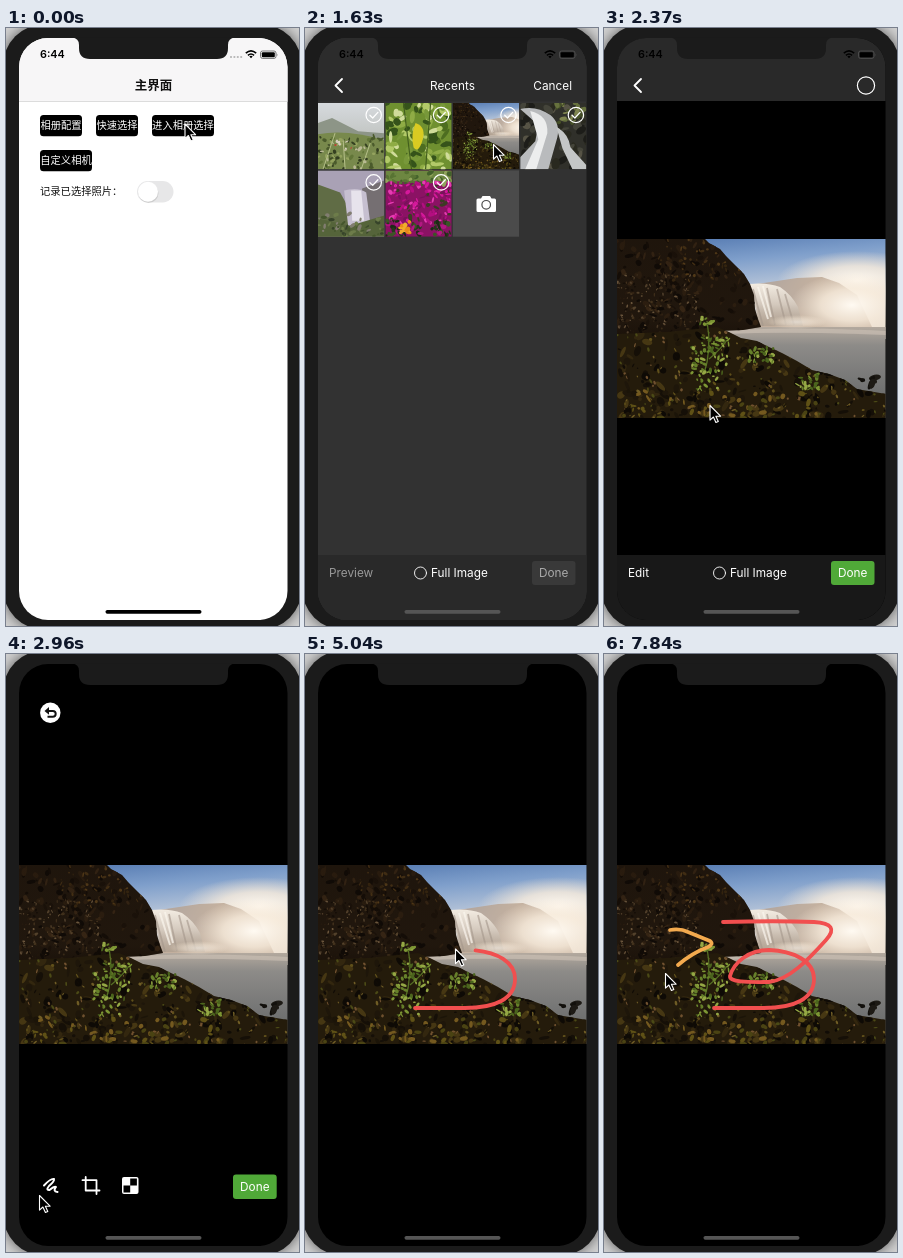
Animation, 293 px wide and 598 px high, one loop 7.99 s. Source, as an HTML page:

```html
<!DOCTYPE html>
<html lang="zh-CN">
<head>
<meta charset="utf-8">
<title>Photo picker</title>
<style>
html, body { margin: 0; width: 100%; height: 100%; overflow: hidden; background: #d2d2d2; }
svg { display: block; }
text { font: 11.8px Inter, "Noto Sans CJK SC", "Noto Sans CJK", sans-serif; fill: #fff; }
.zh { font: 10.3px "Noto Sans CJK SC", "Noto Sans CJK", sans-serif; }
.title { font-size: 12.5px; font-weight: 600; fill: #111; }
.ink { fill: #111; }
.clock { font-weight: 600; font-size: 10.8px; fill: #000; }
.line { fill: none; stroke: #fff; stroke-linecap: round; stroke-linejoin: round; }
.body { fill: #1b1b1b; filter: drop-shadow(0 0 7px rgba(0, 0, 0, .6)); }
</style>
</head>
<body>
<svg id="stage" width="293" height="598" viewBox="0 0 293 598">
  <defs>
    <clipPath id="screen"><rect x="13" y="10" width="268.5" height="582" rx="29"/></clipPath>
    <clipPath id="cliffClip"><path id="cliff" d="M0 0H88L92 4L103 10L109 17L119 27L127 35L133 45L137 56L138 70L141 80L144 88L126 91L100 92L0 100Z"/></clipPath>
    <clipPath id="shoreClip"><path id="shore" d="M0 95L50 93L100 88L112 93L124 99L140 102L152 108L165 114L180 122L195 131L212 135L228 141L240 150L269 155V179H0Z"/></clipPath>
    <linearGradient id="sky" x1="0" y1="0" x2=".25" y2="1">
      <stop offset="0" stop-color="#4e74ad"/><stop offset=".3" stop-color="#7f9fcb"/>
      <stop offset=".65" stop-color="#c6cfdc"/><stop offset="1" stop-color="#eadfd2"/>
    </linearGradient>
    <linearGradient id="river" x2="0" y2="1">
      <stop offset="0" stop-color="#b3a99e"/><stop offset=".2" stop-color="#8d8b88"/><stop offset="1" stop-color="#5f6264"/>
    </linearGradient>
    <linearGradient id="fall" x2="0" y2="1">
      <stop offset="0" stop-color="#f3ece2"/><stop offset=".5" stop-color="#d3c8bc"/><stop offset="1" stop-color="#a89a8b" stop-opacity=".6"/>
    </linearGradient>
    <radialGradient id="glow">
      <stop offset="0" stop-color="#fffaf2"/><stop offset=".5" stop-color="#f8ecdc" stop-opacity=".8"/><stop offset="1" stop-color="#f4e6d4" stop-opacity="0"/>
    </radialGradient>
    <linearGradient id="shade" x2="0" y2="1">
      <stop offset="0" stop-color="#140c06" stop-opacity=".25"/><stop offset=".8" stop-color="#140c06" stop-opacity=".1"/><stop offset="1" stop-color="#140c06" stop-opacity=".55"/>
    </linearGradient>
    <linearGradient id="haze" x2="0" y2="1">
      <stop offset="0" stop-color="#d6dade"/><stop offset="1" stop-color="#aeb0a6"/>
    </linearGradient>
    <symbol id="photo" viewBox="0 0 269 179" overflow="hidden"></symbol>
    <g id="check"><circle r="7.7" class="line" stroke-width="1.2"/><path class="line" stroke-width="1.3" d="M-3.8 .2L-1 3L4.2 -2.6"/></g>
    <path id="back" class="line" stroke-width="1.8" d="M37 51L30.5 57.5L37 64"/>
    <g id="undo"><path fill="none" stroke="currentColor" stroke-width="2" d="M-3 -1.8H1.8A2.900 2.900 0 0 1 1.800 4H-3.500"/><path fill="currentColor" d="M-2 -5.600V2L-6.500 -1.800Z"/></g>
  </defs>

  <rect class="body" x="-3" y="-4" width="299" height="606" rx="42"/>
  <g clip-path="url(#screen)">
    <g id="home">
      <rect x="13" y="10" width="269" height="582" fill="#fff"/>
      <rect x="13" y="10" width="269" height="63" fill="#f7f6f7"/>
      <rect x="13" y="73" width="269" height="1" fill="#dcdcdc"/>
      <text class="zh title" x="147.5" y="62" text-anchor="middle">主界面</text>
      <g id="buttons"></g>
      <text class="zh ink" x="34" y="167">记录已选择照片：</text>
      <rect x="131" y="153" width="36.5" height="21.5" rx="10.75" fill="#e7e7e8"/>
      <circle cx="142.5" cy="165" r="10" fill="#bbb" opacity=".6"/>
      <circle cx="142" cy="163.7" r="10" fill="#fff"/>
    </g>

    <g id="sheet">
      <g id="album">
        <rect x="13" y="10" width="269" height="582" fill="#323232"/>
        <rect x="13" y="10" width="269" height="63.5" fill="#2c2c2c"/>
        <use href="#back"/>
        <text x="147.5" y="61.5" text-anchor="middle">Recents</text>
        <text x="267" y="61.5" text-anchor="end">Cancel</text>
        <g id="grid"></g>
        <rect x="13" y="527" width="269" height="65" fill="#292929"/>
        <text x="24" y="549.3" style="fill:#999">Preview</text>
        <circle cx="115.5" cy="545" r="6" class="line" stroke-width=".9"/>
        <text x="126" y="549.3">Full Image</text>
        <rect x="227" y="533" width="43.5" height="24" rx="3" fill="#393939"/>
        <text x="248.7" y="549.3" text-anchor="middle" style="fill:#aaa">Done</text>
      </g>
      <rect id="dim" x="13" y="10" width="269" height="582" opacity="0"/>
    </g>

    <g id="preview">
      <rect x="13" y="10" width="269" height="582"/>
      <rect x="13" y="10" width="269" height="63" fill="#292929"/>
      <use href="#back"/>
      <circle cx="262" cy="57.5" r="8.6" class="line" stroke-width="1.2"/>
      <use href="#photo" x="13" y="211" width="269" height="179"/>
      <rect x="13" y="527" width="269" height="65" fill="#181818"/>
      <text x="24" y="549.3">Edit</text>
      <circle cx="115.5" cy="545" r="6" class="line" stroke-width=".9"/>
      <text x="126" y="549.3">Full Image</text>
      <rect x="227" y="533" width="43.5" height="24" rx="3" fill="#50a938"/>
      <text x="248.7" y="549.3" text-anchor="middle">Done</text>
    </g>

    <g id="editor">
      <rect x="13" y="10" width="269" height="582"/>
      <use href="#photo" x="13" y="211" width="269" height="179"/>
      <path id="red" class="line" style="stroke:#f14f4f" stroke-width="3.8" d="M110 354H160C190 354 210 345 210 325C210 306 188 297 165 296C145 296 130 308 126 322C125 329 148 328 165 328C185 326 205 305 222 286C232 275 228 269 210 268C185 267 155 267 119 268"/>
      <path id="amber" class="line" style="stroke:#f3aa4e" stroke-width="3.8" d="M66 276C72 275 78 275 84 278L106 287Q110 290 104 293Q88 299 74 311"/>
      <g id="tools">
        <circle cx="44.3" cy="58.7" r="10.2" fill="#fff"/>
        <use href="#undo" x="45" y="58.7" color="#111"/>
        <path id="pen" class="line" stroke-width="2" d="M38 531.5Q45 524 48 525Q48.500 527.500 43 532Q39.500 536.500 43.500 536Q48.500 532 50 533Q46.500 537.500 51.500 538"/>
        <path class="line" stroke-width="1.8" d="M76.5 526.2H90.5V540M79.700 523V536.500H93.500"/>
        <rect x="116" y="523" width="16.5" height="17" rx="2" fill="#fff"/>
        <path d="M124.2 524.5h6.7v7h-6.7zM117.5 531.5h6.7v7h-6.7z"/>
        <rect x="227" y="520.5" width="43.7" height="24.5" rx="3" fill="#50a938"/>
        <text x="248.8" y="537.3" text-anchor="middle">Done</text>
        <g id="palette"><g id="dots"></g><use id="revoke" href="#undo" x="259.5" y="493.5" color="#fff"/></g>
      </g>
    </g>

    <g id="status">
      <text class="clock" x="34" y="30.2">6:44</text>
      <g id="signal" fill="#b5b5b5"><circle cx="225" cy="29" r="1.1"/><circle cx="228.4" cy="29" r="1.1"/><circle cx="231.8" cy="29" r="1.1"/><circle cx="235.2" cy="29" r="1.1"/></g>
      <path fill="none" stroke="#000" stroke-width="1.6" d="M239.8 25.2Q245 20.6 250.2 25.2M241.9 27.3Q245 24.7 248.1 27.3"/>
      <path d="M243.3 28.4Q245 27.2 246.7 28.4L245 30.2Z"/>
      <rect x="254.5" y="23" width="15.5" height="7.4" rx="2" fill="none" stroke="#555" stroke-width=".8"/>
      <rect x="255.8" y="24.2" width="13" height="5" rx="1"/>
      <path d="M270.9 25.2v3q1.2-.5 0-3" fill="#555"/>
    </g>
    <rect id="bar" x="99.5" y="582" width="96" height="3.7" rx="1.85"/>
  </g>
  <path fill="#1b1b1b" d="M66 9.5Q73 10 73 17V20Q73 31 84 31H211Q222 31 222 20V17Q222 10 229 9.5Z"/>
  <path id="cursor" d="M0 0V14.6L3.4 11.5L5.9 17L8.3 16L5.9 10.7H10.6Z" stroke="#fff" stroke-width="1.1" stroke-linejoin="round"/>
</svg>
<script>
const $ = id => document.getElementById(id);
const LOOP = 7990, STEP = 148;

let seed = 11;
const rnd = () => (seed = (seed * 16807) % 2147483647) / 2147483647;

// Scatter of small tilted ellipses inside a box.
function scatter(count, x, y, w, h, size, colors) {
  let out = '';
  for (let i = 0; i < count; i++) {
    const cx = (x + rnd() * w).toFixed(1), cy = (y + rnd() * h).toFixed(1);
    const rx = (size * (.4 + rnd())).toFixed(1), ry = (size * (.25 + rnd() * .6)).toFixed(1);
    const fill = colors[Math.floor(rnd() * colors.length)];
    out += `<ellipse cx="${cx}" cy="${cy}" rx="${rx}" ry="${ry}" fill="${fill}" transform="rotate(${Math.floor(rnd() * 180)} ${cx} ${cy})"/>`;
  }
  return out;
}
const shape = (d, fill, more = '') => `<path d="${d}" fill="${fill}" ${more}/>`;
const box = (x, y, w, h, fill) => `<rect x="${x}" y="${y}" width="${w}" height="${h}" fill="${fill}"/>`;

const leaf = ['#66802a', '#7d9634', '#4b641d', '#95a845'];
$('photo').innerHTML =
  box(0, 0, 269, 100, 'url(#sky)') +
  '<ellipse cx="240" cy="42" rx="80" ry="30" fill="url(#glow)"/>' +
  shape('M140 45L160 42L180 39L205 38L222 44L240 56L255 88H140Z', '#b7a18c', 'opacity=".75"') +
  '<ellipse cx="235" cy="66" rx="62" ry="32" fill="url(#glow)"/>' +
  box(90, 88, 179, 91, 'url(#river)') +
  shape('M110 92Q160 87 269 92V96Q170 92 110 95Z', '#cfc4b8', 'opacity=".6"') +
  shape('M132 45Q150 43 163 48Q175 56 181 68L186 87H142L137 62Z', 'url(#fall)') +
  shape('M136 50L146 87M150 49L158 86M160 50L169 86M168 55L177 86', 'none', 'stroke="#a4968a" stroke-width="1.8" opacity=".6"') +
  shape('M141 48L151 80M146 47L154 78', 'none', 'stroke="#fbf6ee" stroke-width="2" opacity=".7"') +
  '<ellipse cx="180" cy="83" rx="30" ry="7" fill="url(#glow)" opacity=".6"/>' +
  '<use href="#cliff" fill="#22180e"/><g clip-path="url(#cliffClip)">' +
  scatter(190, 0, 0, 145, 95, 3.2, ['#140d07', '#2f2011', '#3a2816', '#1b120a', '#0f0a06']) +
  scatter(210, 0, 34, 80, 60, 1.4, ['#5b4830', '#765f43', '#493720', '#150e08', '#2a1d10']) +
  scatter(60, 40, 0, 85, 42, 1.8, ['#4d3617', '#5f431c', '#3b2911']) +
  box(0, 0, 150, 100, 'url(#shade)') + '</g>' +
  '<use href="#shore" fill="#241b0b"/><g clip-path="url(#shoreClip)">' +
  scatter(190, 0, 92, 269, 88, 4.5, ['#150f07', '#33270f', '#463713', '#1e160a', '#0e0a05']) +
  scatter(240, 0, 92, 269, 88, 1.8, ['#5f4f1a', '#6f5c25', '#4b4a16', '#70512f', '#110c06']) +
  scatter(90, 0, 148, 200, 31, 3, ['#5f5116', '#4a4313', '#74591f', '#1b1408']) + '</g>' +
  scatter(8, 241, 137, 18, 12, 4.5, ['#12100c', '#1d1a15']) +
  '<path d="M87 135Q95 110 90 82M92 120Q104 110 110 101" fill="none" stroke="#556f24" stroke-width="1.3"/>' +
  scatter(14, 83, 77, 14, 10, 2.3, leaf) + scatter(60, 74, 98, 38, 36, 2.3, leaf) +
  scatter(18, 78, 132, 24, 20, 2, leaf) + scatter(30, 132, 109, 26, 14, 2.2, leaf) +
  scatter(28, 178, 135, 24, 18, 2.2, leaf);

// Album thumbnails, each on a 66 by 66 field.
const thumbs = [
  () => box(0, 0, 66, 66, 'url(#haze)') + shape('M0 20L14 15L40 28L66 30V40H0Z', '#8d9587') +
    shape('M0 31Q30 26 66 37V66H0Z', '#78894c') +
    scatter(90, 0, 33, 66, 34, 2.2, ['#4a5a2b', '#627638', '#94a35e', '#343f20', '#b9b894']) +
    shape('M5 66L17 30M27 66L25 36M43 66L52 40', 'none', 'stroke="#b5bf89"') +
    scatter(8, 17, 38, 20, 8, 1.6, ['#ba4535', '#d8cfc0']),
  () => box(0, 0, 66, 66, '#6f9030') +
    scatter(95, 0, 0, 66, 66, 5, ['#8fac45', '#b3ca69', '#4d6d20', '#35531a', '#78983a', '#d0dc9a']) +
    shape('M30 20Q42 24 36 40Q32 50 28 44Q25 32 30 20Z', '#d9cb22') +
    shape('M18 0L26 66M45 0L40 66', 'none', 'stroke="#435f1d" stroke-width="1.2"'),
  () => '<svg width="66" height="66" viewBox="45 0 179 179"><use href="#photo" width="269" height="179"/></svg>',
  () => box(0, 0, 66, 66, '#30302a') +
    scatter(60, 0, 0, 66, 66, 5, ['#1d1d19', '#44443a', '#29291f', '#565345']) +
    scatter(25, 34, 0, 32, 20, 3, ['#66713d', '#7f8450', '#465027']) +
    shape('M0 6Q16 2 30 12Q40 20 37 34L28 66H0V54L15 38L18 22Z', '#b9bbbd') +
    shape('M10 8Q28 12 27 30L16 66H5L18 36Z', '#eceded') +
    shape('M36 24Q48 30 50 44L66 62V66H52L42 45Z', '#c4c6c6'),
  () => box(0, 0, 66, 66, '#a9a1b5') + shape('M0 14L22 22L32 40L30 66H0Z', '#606c45') +
    shape('M44 18L66 10V66H38Z', '#756f72') +
    shape('M26 20Q40 16 48 22L52 52L30 55Z', '#c6bfd0') +
    shape('M33 20L43 20L46 50L34 50Z', '#e7e3ec') +
    shape('M0 48L32 55L66 45V66H0Z', '#55643a') +
    scatter(45, 0, 42, 66, 24, 2.4, ['#45562d', '#6d7c4a', '#817d70', '#37442a']),
  () => box(0, 0, 66, 66, '#8b1264') + box(0, 0, 66, 11, '#6d8741') +
    scatter(35, 0, 0, 66, 14, 3, ['#43612b', '#91a45c', '#587333']) +
    scatter(130, 0, 12, 66, 42, 2.5, ['#d5189b', '#b30e80', '#e63bb2', '#79105b', '#3d3b24']) +
    scatter(50, 0, 50, 66, 16, 2.8, ['#26381c', '#3c5526', '#b21782', '#1d2b16']) +
    scatter(10, 12, 50, 14, 12, 2.8, ['#e98a19', '#f0ad2b'])
];
const CELL = 67.4;
const cellAt = i => [13 + (i % 4) * CELL, 75 + Math.floor(i / 4) * CELL];
$('grid').innerHTML = thumbs.map((draw, i) => {
  const [x, y] = cellAt(i);
  return `<svg x="${x}" y="${y}" width="66.3" height="66.3" viewBox="0 0 66 66">${draw()}</svg><use href="#check" x="${x + 55.7}" y="${y + 12}"/>`;
}).join('') +
  box(...cellAt(6), 66.3, 66.3, '#4b4b4b') +
  '<path fill="#fff" d="M173 170.5H176L177.5 168H185L186.5 170.5H189.5Q191 170.5 191 172V182.5Q191 184 189.5 184H173Q171.5 184 171.5 182.5V172Q171.5 170.5 173 170.5Z"/>' +
  '<circle cx="181.2" cy="176.8" r="4.3" fill="#fff" stroke="#4b4b4b" stroke-width="1.2"/>';

$('buttons').innerHTML = [[34, 87, 42, '相册配置'], [90, 87, 42, '快速选择'], [146, 87, 62, '进入相册选择'], [34, 122, 52, '自定义相机']]
  .map(([x, y, w, label]) => `<rect x="${x}" y="${y}" width="${w}" height="21.3" rx="3.5"/><text class="zh" x="${x + w / 2}" y="${y + 14.3}" text-anchor="middle">${label}</text>`).join('');

const inks = ['#fff', '#000', '#f14f4f', '#f3aa4e', '#50a938', '#1eb7f3', '#8b69ea'];
$('dots').innerHTML = inks.map(c => `<g><circle r="7.1" fill="#fff"/><circle r="5.7" fill="${c}"/></g>`).join('');

// Tables of [step, value...]; values between rows are linear.
const cursorAt = [[5, 179, 96], [8, 182, 102], [11, 188.5, 116.5], [13, 188.5, 116.5], [15, 150, 250], [17, 62, 505], [18, 44, 541],
  [20, 33.5, 541.5], [24, 42, 532], [27, 42, 532], [28, 55, 490], [29, 88, 400], [30, 109, 354],
  [31, 118, 354], [32, 160, 354], [33, 210, 327], [34, 150.5, 295], [35, 126, 324], [36, 170, 328], [37, 215, 294], [38, 226, 271],
  [39, 165, 267], [40, 119, 268], [41, 119, 272], [42, 122, 330], [43, 130, 430], [44, 134, 485], [45, 135, 493], [47, 135, 493],
  [48, 120, 440], [49, 90, 350], [50, 70, 290], [51, 66, 276], [52, 107, 290], [53, 61.5, 319.5]];
const sheetAt = [[3, 582], [4, 525], [5, 248], [6, 86], [7, 27], [8, 8], [9, 0]];
const pushAt = [[11, 269], [12, 125], [13, 20], [14, 4], [15, 0]];
const toolsAt = [[30, 1], [31, .4], [32, 0], [40, 0], [41, .5], [42, 1], [51, 1], [52, .3], [53, 0]];
const redAt = [[30, 0], [31, 6], [32, 42], [33, 105], [34, 168], [35, 212], [36, 258], [37, 320], [38, 352], [39, 405], [40, 500]];
const amberAt = [[51, 0], [52, 42], [53, 120]];

function at(table, n) {
  const j = table.findIndex(row => row[0] >= n);
  if (j < 0) return table[table.length - 1].slice(1);
  if (j === 0) return table[0].slice(1);
  const a = table[j - 1], b = table[j], k = (n - a[0]) / (b[0] - a[0]);
  return a.slice(1).map((v, i) => v + (b[i + 1] - v) * k);
}
const move = (id, x, y) => $(id).setAttribute('transform', `translate(${x} ${y})`);
const show = (id, on) => $(id).setAttribute('display', on ? 'inline' : 'none');
function stroke(id, length) {
  show(id, length > 0);
  $(id).style.strokeDasharray = `${length} 999`;
}

function render(n) {
  const [push] = at(pushAt, n), [red] = at(redAt, n), pushed = 1 - push / 269;
  const editing = n >= 20, drawing = n >= 25, picked = n >= 46 ? 3 : 2;
  move('cursor', ...at(cursorAt, n));
  show('home', n < 9);
  show('sheet', n >= 4 && !editing);
  move('sheet', 0, at(sheetAt, n)[0]);
  move('album', -81 * pushed, 0);
  $('dim').setAttribute('opacity', .12 * pushed);
  show('preview', n >= 12 && !editing);
  move('preview', push, 0);
  show('editor', editing);
  show('status', !editing);
  show('signal', n < 8);
  $('bar').setAttribute('fill', n < 4 ? '#000' : '#555');
  $('tools').setAttribute('opacity', at(toolsAt, n)[0]);
  $('pen').style.stroke = drawing ? '#50a938' : '#fff';
  show('palette', drawing);
  $('revoke').setAttribute('opacity', red > 0 ? 1 : .45);
  [...$('dots').children].forEach((dot, i) =>
    dot.setAttribute('transform', `translate(${38 + i * 32.3} 493) scale(${i === picked ? 1.33 : 1})`));
  stroke('red', red);
  stroke('amber', at(amberAt, n)[0]);
}

let last = -1;
function tick() {
  const n = Math.min(53, Math.floor((performance.now() % LOOP + 6) / STEP));
  if (n !== last) render(last = n);
  requestAnimationFrame(tick);
}
tick();
</script>
</body>
</html>
```
